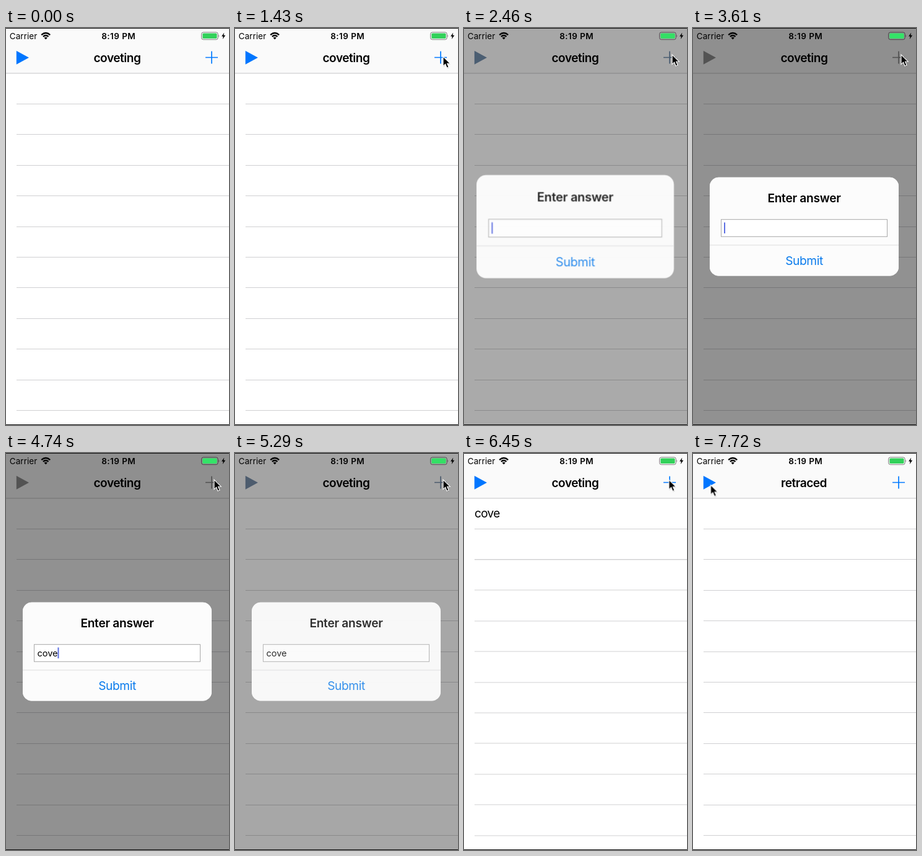
An HTML page that plays this animation: 360x640 px, repeating every 8000 ms.

```html
<!DOCTYPE html>
<html lang="en">
<head>
<meta charset="utf-8">
<title>Word game</title>
<style>
  html, body { margin: 0; width: 100%; height: 100%; overflow: hidden; background: #fff; }
  svg { display: block; width: 100vw; height: 100vh; font-family: Inter, "Liberation Sans", sans-serif; }
  .line { stroke: #d0d0d2; stroke-width: 1; }
  .body { font-size: 19.1px; letter-spacing: -.35px; }
  .bold { font-size: 19.1px; font-weight: 600; letter-spacing: -.48px; }
  .mid { text-anchor: middle; }
  .status { font-size: 13.5px; letter-spacing: .08px; }
  .field { font-size: 14.6px; letter-spacing: -.1px; }
  .panel { fill: #fcfcfc; }
  #cell text { letter-spacing: -.7px; }
  #content .bold { letter-spacing: -.25px; }
  #alert { transform-origin: 179.5px 320.3px; }
  #plus { fill: none; stroke: #007aff; stroke-width: 1.7; }
  #play { fill: #0076ff; }
</style>
</head>
<body>
<svg viewBox="0 0 360 640">
  <rect width="360" height="640" fill="#fff"/>
  <g id="rows"></g>
  <g id="cell">
    <text class="body" x="17" y="104.3">cove</text>
    <path class="line" d="M17 122.5H360"/>
  </g>

  <rect width="360" height="73" fill="#fafafa"/>
  <path d="M0 73H360" stroke="#c4c4c6"/>
  <path id="play" d="M16.8 36.8L37 47.8L16.8 58.8Z"/>
  <text id="word1" class="bold mid" x="179.5" y="55">coveting</text>
  <text id="word2" class="bold mid" x="179" y="55">retraced</text>
  <path id="plus" d="M322 47.5H342M332 37.5V57.5"/>

  <rect id="dim" width="360" height="640"/>

  <text class="status" x="5.7" y="17.6">Carrier</text>
  <g fill="none" stroke="#000" stroke-width="2.3">
    <path d="M57.2 11.1Q64.2 4.9 71.2 11.1"/>
    <path d="M59.9 13.9Q64.2 10.2 68.5 13.9"/>
  </g>
  <path d="M61.6 15.8Q64.2 13.8 66.8 15.8L64.2 18.5Z"/>
  <text class="status mid" x="181.7" y="17.6" font-weight="600" style="letter-spacing:.45px">8:19 PM</text>
  <rect x="315.6" y="6.9" width="26.6" height="11.8" rx="3" fill="none" stroke="#000" stroke-opacity=".5"/>
  <rect id="charge" x="317.3" y="8.6" width="23.2" height="8.4" rx="1.6" fill="#32d15a"/>
  <path d="M343.4 10.8Q345 12.8 343.4 14.8Z" fill-opacity=".5"/>
  <path d="M352.2 7.6L348 13.4H350.6L349.8 18L354.2 11.8H351.4Z"/>

  <g id="alert">
    <rect id="back" class="panel" x="27" y="240.8" width="305" height="158.8" rx="14.6"/>
    <g id="content">
      <rect class="panel" x="27" y="240.8" width="305" height="158.8" rx="14.6"/>
      <text class="bold mid" x="179.5" y="281.4">Enter answer</text>
      <rect x="45.5" y="308.7" width="268" height="27.6" fill="#fff" stroke="#a8a8a8"/>
      <g id="typed"></g>
      <rect id="caret" x="50.1" y="313.5" width="1.9" height="17.6" fill="#5468e2"/>
      <path d="M27 350H332" stroke="#dcdcdd"/>
      <text class="body mid" x="179.5" y="381.8" fill="#087aec">Submit</text>
    </g>
  </g>

  <g id="cursor">
    <path d="M0 0V15.6L3.6 12.3L6 18.2L9 17L6.5 11.2H11.2Z" transform="translate(.6 1.4)" fill-opacity=".18"/>
    <path d="M0 0V15.6L3.6 12.3L6 18.2L9 17L6.5 11.2H11.2Z" stroke="#fff" stroke-width="1.1"/>
  </g>

  <path d="M0 .5H360M0 639.5H360" stroke="#111"/>
</svg>
<script>
const LOOP = 8000, ROW = 49.42;
const HOLD = 'steps(1, end)', OUT = 'cubic-bezier(.25,.5,.25,1)', INOUT = 'ease-in-out';
const $ = id => document.getElementById(id);

function make(parent, tag, attrs, text = '') {
  const el = document.createElementNS('http://www.w3.org/2000/svg', tag);
  for (const key in attrs) el.setAttribute(key, attrs[key]);
  el.textContent = text;
  return parent.appendChild(el);
}

// steps: [ms, value, easing towards the next step]
function run(el, prop, steps) {
  const last = steps[steps.length - 1];
  const all = [...steps, [LOOP, last[1]]];
  if (all[0][0] > 0) all.unshift([0, all[0][1]]);
  el.animate(all.map(([ms, value, easing = HOLD]) => ({ offset: ms / LOOP, [prop]: value, easing })),
    { duration: LOOP, iterations: Infinity });
}

const show = (el, from, to) => run(el, 'opacity', [[0, from ? 0 : 1], [from, 1], [to, 0]]);
const move = (x, y = 0) => `translate(${x}px, ${y}px)`;

for (let k = 1; k <= 11; k++) {
  const y = Math.floor(73 + ROW * k) + .5;
  make($('rows'), 'path', { class: 'line', d: `M17 ${y}H360` });
}

// Alert opening and closing; the backing keeps the panel bright while its content fades
const OPEN = 2310, CLOSE = 5217, GONE = 5457;
const fade = (a, b, length) => [[0, a], [OPEN, a, OUT], [OPEN + length, b], [CLOSE, b, INOUT], [GONE, a]];
run($('dim'), 'opacity', fade(0, .43, 400));
run($('back'), 'opacity', fade(0, 1, 330));
run($('content'), 'opacity', fade(0, 1, 330));
run($('alert'), 'transform', [[0, 'scale(1.19)'], [OPEN, 'scale(1.19)', OUT], [OPEN + 400, 'scale(1)']]);
run($('plus'), 'stroke', fade('#007aff', '#8c8c8c', 400));
run($('play'), 'fill', fade('#0076ff', '#929292', 400));
run($('charge'), 'fill', fade('#32d15a', '#34e368', 400));

// Bar button presses
run($('plus'), 'opacity', [[0, 1], [2220, .35], [2290, .35, 'linear'], [2400, 1]]);
run($('play'), 'opacity', [[0, 1], [7580, .35], [7620, .35, 'linear'], [7710, 1]]);

// Typing
const keys = [3820, 4020, 4220, 4430];
const caretSteps = [[0, move(0)]];
keys.forEach((ms, i) => {
  const part = make($('typed'), 'text', { class: 'field', x: 50.6, y: 327.6 }, 'cove'.slice(0, i + 1));
  show(part, ms, keys[i + 1] || GONE);
  caretSteps.push([ms, move(part.getComputedTextLength() + .6)]);
});
run($('caret'), 'transform', caretSteps);
run($('caret'), 'opacity', [
  [0, 1], [2900, 1, 'linear'], [3000, 0], [3250, 0, 'linear'], [3350, 1],
  [4900, 1, 'linear'], [5000, 0]
]);

// New row, then the next word
const ADD = 5799, NEXT = 7620;
run($('rows'), 'transform', [[0, move(0)], [ADD, move(0), INOUT], [ADD + 300, move(0, ROW)], [NEXT, move(0)]]);
run($('cell'), 'opacity', [[0, 0], [ADD, 0, INOUT], [ADD + 300, 1], [NEXT, 0]]);
show($('word1'), 0, NEXT);
show($('word2'), NEXT, LOOP);

run($('cursor'), 'transform', [
  [0, move(322, -24)], [120, move(322, -24), INOUT], [480, move(339, 83), INOUT],
  [860, move(340, 57), INOUT], [1300, move(336, 46)], [1500, move(336, 46), INOUT],
  [1670, move(336, 43)], [6400, move(336, 43), INOUT], [6960, move(14, 58), INOUT],
  [7180, move(27.5, 52.5), 'linear'], [7250, move(28.5, 51.5)]
]);
</script>
</body>
</html>
```
